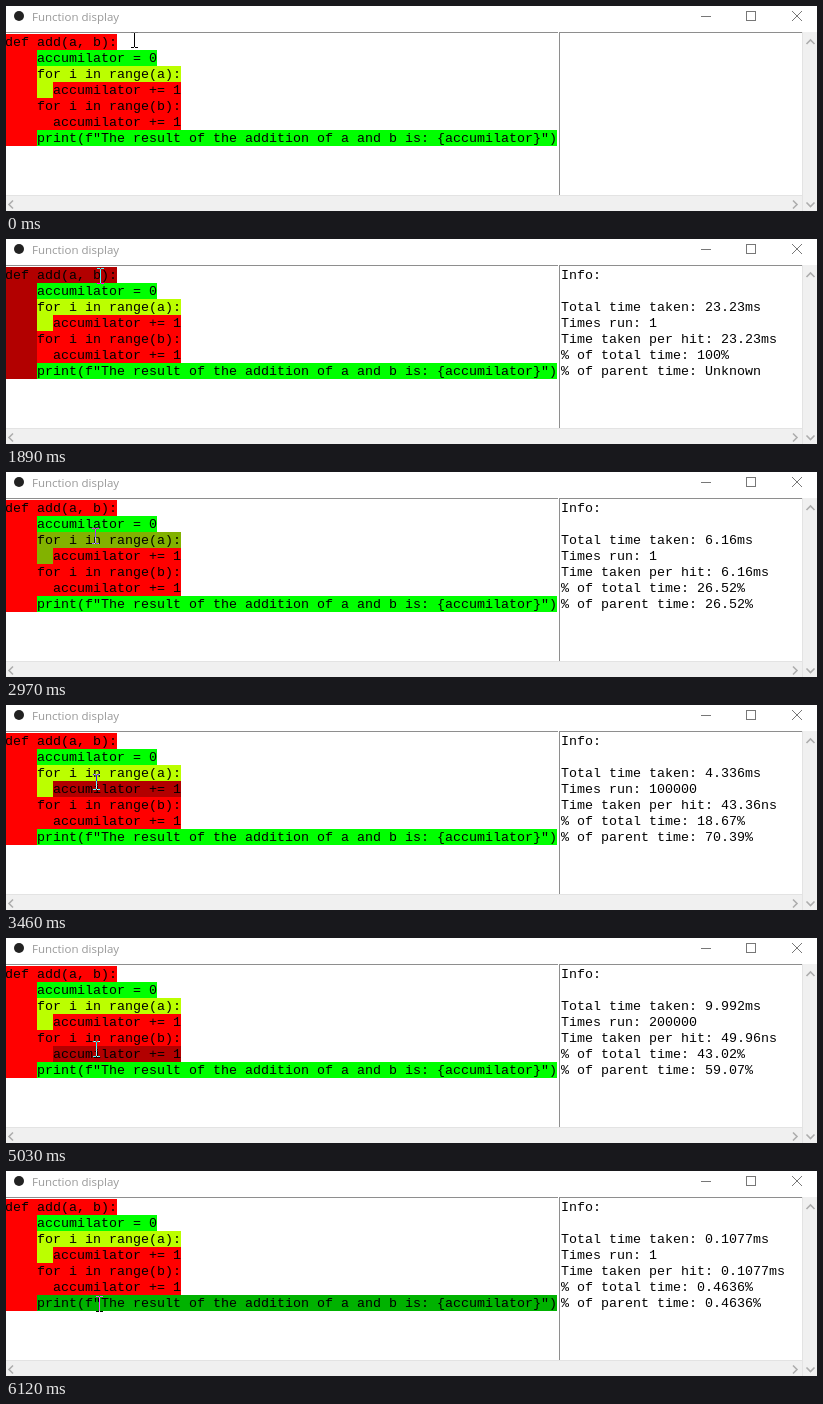
Recreate the animation shown at these times as an HTML page. Size 811 by 205 pixels, loop 7.99 s.

```html
<!DOCTYPE html>
<html lang="en">
<head>
<meta charset="utf-8">
<title>Function display</title>
<style>
  html, body { margin: 0; width: 100%; height: 100%; overflow: hidden; background: #fff; }
  svg { display: block; width: 811px; height: 205px; }
  .mono { font: 13.333px "Liberation Mono", "Courier New", monospace; white-space: pre; }
  .title { font: 11.5px "Open Sans", "Noto Sans", sans-serif; fill: #999; }
  .line { fill: none; stroke: #777; }
  .chevron { fill: none; stroke: #adadad; stroke-width: 1.6; }
  #cursor { fill: #fff; mix-blend-mode: difference; }
</style>
</head>
<body>
<svg viewBox="0 0 811 205" xmlns="http://www.w3.org/2000/svg">
  <rect width="811" height="205" fill="#fff"/>
  <circle cx="13" cy="10" r="5" fill="#222"/>
  <text class="title" x="26" y="15">Function display</text>
  <path class="line" d="M695 10.5h10M740.5 5.5h9v9h-9z" shape-rendering="crispEdges"/>
  <path class="line" d="M786 5l10 10M796 5l-10 10"/>
  <g shape-rendering="crispEdges">
    <path fill="#f0f0f0" d="M0 190h797v15H0zM797 26h14v179h-14z"/>
    <path fill="#e3e3e3" d="M0 189h796v1H0zM796 26h1v179h-1z"/>
    <path fill="#8e8e8e" d="M0 26h552v1H0zM553 26h243v1h-243zM553 26h1v163h-1z"/>
  </g>
  <path class="chevron" d="M7 194.5l-4 4 4 4M787 194.5l4 4-4 4M800.5 38l4-4 4 4M800.5 196.5l4 4 4-4"/>
  <g id="blocks" shape-rendering="crispEdges"></g>
  <g id="code"></g>
  <g id="info"></g>
  <path id="cursor" shape-rendering="crispEdges" d="M-3-8h3v1h-3zM1-8h3v1h-3zM0-7h1v14h-1zM-3 7h3v1h-3zM1 7h3v1h-3z"/>
</svg>
<script>
const LOOP = 7990, TOP = 28, ROW = 16;
const $ = id => document.getElementById(id);

const code = [
  'def add(a, b):',
  '    accumilator = 0',
  '    for i in range(a):',
  '      accumilator += 1',
  '    for i in range(b):',
  '      accumilator += 1',
  '    print(f"The result of the addition of a and b is: {accumilator}")'
];

// total time, runs, time per hit, share of total, share of parent
const stats = [
  ['23.23ms', '1', '23.23ms', '100%', 'Unknown'],
  ['0.2638µs', '1', '0.2638µs', '0.001136%', '0.001136%'],
  ['6.16ms', '1', '6.16ms', '26.52%', '26.52%'],
  ['4.336ms', '100000', '43.36ns', '18.67%', '70.39%'],
  ['16.91ms', '1', '16.91ms', '72.83%', '72.83%'],
  ['9.992ms', '200000', '49.96ns', '43.02%', '59.07%'],
  ['0.1077ms', '1', '0.1077ms', '0.4636%', '0.4636%']
];
const labels = ['Total time taken', 'Times run', 'Time taken per hit', '% of total time', '% of parent time'];

const red = ['#f00', '#b20000'], green = ['#0f0', '#00b200'], lime = ['#bf0', '#82b200'];
const colors = [red, green, lime, red, red, red, green];

// indents belong to the statement that encloses them: first row, row count, left, right
const indents = { 0: [1, 6, 0, 31], 2: [3, 1, 31, 47], 4: [5, 1, 31, 47] };

// cursor moves: start, end, steps, x, y
const home = [128, 34];
const moves = [
  [590, 1330, 11, 105, 29],
  [1400, 2150, 11, 88, 41],
  [2220, 2360, 3, 87, 50],
  [2420, 2420, 1, 86, 50],
  [2620, 3040, 7, 90, 66],
  [3250, 3670, 7, 90, 86],
  [3940, 4360, 7, 90, 99],
  [4630, 4760, 3, 90, 106],
  [4960, 5030, 2, 90, 111],
  [5160, 5230, 2, 90, 118],
  [5430, 6120, 11, 93, 133]
];

function add(parent, name, attrs) {
  const el = document.createElementNS('http://www.w3.org/2000/svg', name);
  for (const key in attrs) el.setAttribute(key, attrs[key]);
  return parent.appendChild(el);
}

const textRow = (parent, x, row) =>
  add(parent, 'text', { class: 'mono', x, y: TOP + 12 + row * ROW });

const box = (x1, x2, row, rows) =>
  `M${x1} ${TOP + row * ROW}H${x2}v${rows * ROW}H${x1}z`;

const rightEdge = row => code[row].length * 8 - 1;

const blocks = code.map((line, row) => {
  const left = Math.max(0, line.search(/\S/) * 8 - 1);
  let d = box(left, rightEdge(row), row, 1);
  if (indents[row]) {
    const [first, count, x1, x2] = indents[row];
    d += box(x1, x2, first, count);
  }
  textRow($('code'), -1, row).textContent = line;
  return add($('blocks'), 'path', { d });
});

const infoRows = code.map((_, row) => textRow($('info'), 555, row));

function cursorAt(t) {
  let [x, y] = home;
  for (const [start, end, steps, toX, toY] of moves) {
    if (t < start) break;
    const done = end > start ? (t - start) / (end - start) : 1;
    const step = Math.floor(done * (steps - 1) + 0.02) + 1;
    const p = Math.min(1, step / steps);
    x += (toX - x) * p;
    y += (toY - y) * p;
  }
  return [Math.round(x), Math.round(y)];
}

function hoveredRow(x, y) {
  const row = Math.floor((y - TOP) / ROW);
  return code[row] && x <= rightEdge(row) ? row : -1;
}

function infoLine(hover, i) {
  if (hover < 0 || i === 1) return '';
  return i === 0 ? 'Info:' : `${labels[i - 2]}: ${stats[hover][i - 2]}`;
}

function render(t) {
  const [x, y] = cursorAt(t);
  const hover = hoveredRow(x, y);
  blocks.forEach((el, i) => el.setAttribute('fill', colors[i][i === hover ? 1 : 0]));
  infoRows.forEach((el, i) => { el.textContent = infoLine(hover, i); });
  $('cursor').setAttribute('transform', `translate(${x} ${y})`);
  $('cursor').setAttribute('visibility', t >= 260 && t < 590 ? 'hidden' : 'visible');
}

const begin = performance.now();
function tick() {
  render((performance.now() - begin) % LOOP);
  requestAnimationFrame(tick);
}
tick();
</script>
</body>
</html>
```
